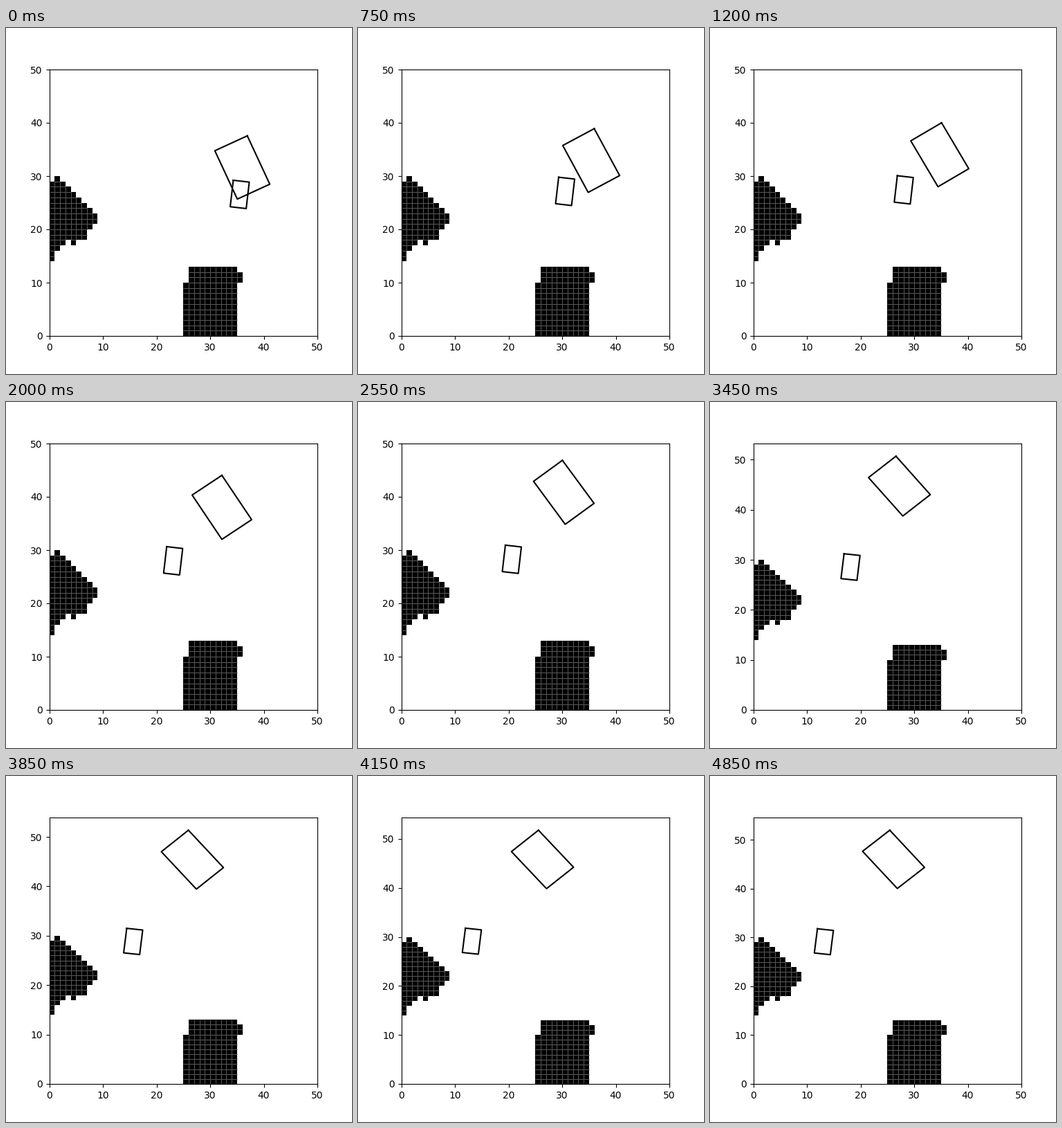
Recreate the animation shown at these times as a matplotlib script. Size 500 by 500 pixels, loop 8 s.

```python
import numpy as np
import matplotlib.pyplot as plt
from matplotlib.animation import FuncAnimation
from matplotlib.collections import LineCollection

TICK = 50          # ms per frame
FRAMES = 160
SIZE = 50          # world width and height

# Pose of the large body at a few of its updates: update, x, y, heading
KEYS = np.array([
    (0, 36.00, 31.62, 24.8),
    (2, 35.89, 31.86, 25.5),
    (5, 35.42, 32.92, 28.3),
    (7, 34.78, 34.00, 30.5),
    (12, 32.19, 38.02, 33.7),
    (15, 30.31, 40.84, 36.2),
    (19, 28.03, 43.77, 38.5),
    (23, 26.69, 45.40, 40.8),
    (28, 26.16, 46.00, 40.4),
])
KEY_N, KEY_POSE = KEYS[:, 0], KEYS[:, 1:]
SLOPES = np.gradient(KEY_POSE, KEY_N, axis=0)
SLOPES[[0, -1]] = 0    # starts and ends at rest

# Small body: constant speed on a straight line
SMALL_START = np.array([35.52, 26.56])
SMALL_TILT = 6.56
SMALL_STEP = 2.5
SMALL_MOVES = 9


def obstacles():
    """Occupancy map: a ragged wedge on the left, a block at the bottom."""
    grid = np.zeros((31, 37), dtype=bool)
    for row in range(14, 29):
        lower = max(7, row - 12) if row >= 18 else max(1, row - 14)
        grid[row, :min(lower, 31 - row)] = True
    grid[17, 4] = grid[29, 1] = True
    grid[:10, 25:35] = True
    grid[10:13, 26:35] = True
    grid[10:12, 35] = True
    return grid


def seams(grid):
    """Edges shared by two occupied cells."""
    upright = [[(c + 1, r), (c + 1, r + 1)]
               for r, c in np.argwhere(grid[:, 1:] & grid[:, :-1])]
    level = [[(c, r + 1), (c + 1, r + 1)]
             for r, c in np.argwhere(grid[1:] & grid[:-1])]
    return upright + level


def box(center, width, height, degrees):
    """Closed outline of a rotated rectangle, starting top right."""
    a = np.radians(degrees)
    rot = np.array([[np.cos(a), -np.sin(a)], [np.sin(a), np.cos(a)]])
    corners = np.array([(1, 1), (1, -1), (-1, -1), (-1, 1), (1, 1)])
    return center + (corners * (width / 2, height / 2)) @ rot.T


def pose(n):
    """Smooth Hermite curve through the key poses."""
    n = min(n, KEY_N[-1])
    k = min(np.searchsorted(KEY_N, n, side="right"), len(KEY_N) - 1)
    h = KEY_N[k] - KEY_N[k - 1]
    u = (n - KEY_N[k - 1]) / h
    ease = u * u * (3 - 2 * u)
    return (KEY_POSE[k - 1] * (1 - ease) + KEY_POSE[k] * ease
            + h * u * (1 - u) * ((1 - u) * SLOPES[k - 1] - u * SLOPES[k]))


def big_box(ms):
    # two timers of different period drive the updates
    n = (ms + 33) // 246 + (ms + 350) // 525
    x, y, heading = pose(n)
    return box((x, y), 20 / 3, 10, heading)


def small_box(ms):
    moves = min(SMALL_MOVES, 1 + ms // 500) if ms >= 100 else 0
    a = np.radians(SMALL_TILT)
    shift = SMALL_STEP * moves * np.array([-np.cos(a), np.sin(a)])
    # starts at the top left corner
    return box(SMALL_START + shift, 5, 3, 90 - SMALL_TILT)


fig, ax = plt.subplots(figsize=(5, 5), dpi=100)
cells = obstacles()
ax.pcolormesh(cells, cmap="binary")
ax.add_collection(LineCollection(seams(cells), colors="0.35", linewidths=0.72))
ax.set_xlim(0, SIZE)
big, = ax.plot([], [], "k")
small, = ax.plot([], [], "k")


def update(i):
    ms = i * TICK
    outline = big_box(ms)
    big.set_data(*outline.T)
    small.set_data(*small_box(ms).T)
    # the view grows with a 5 % margin once the body leaves the map
    top = outline[:, 1].max()
    ax.set_ylim(0, top * 1.05 if top > SIZE else SIZE)
    return big, small


anim = FuncAnimation(fig, update, frames=FRAMES, interval=TICK,
                     repeat=True, repeat_delay=0, blit=False)
plt.show()
```
